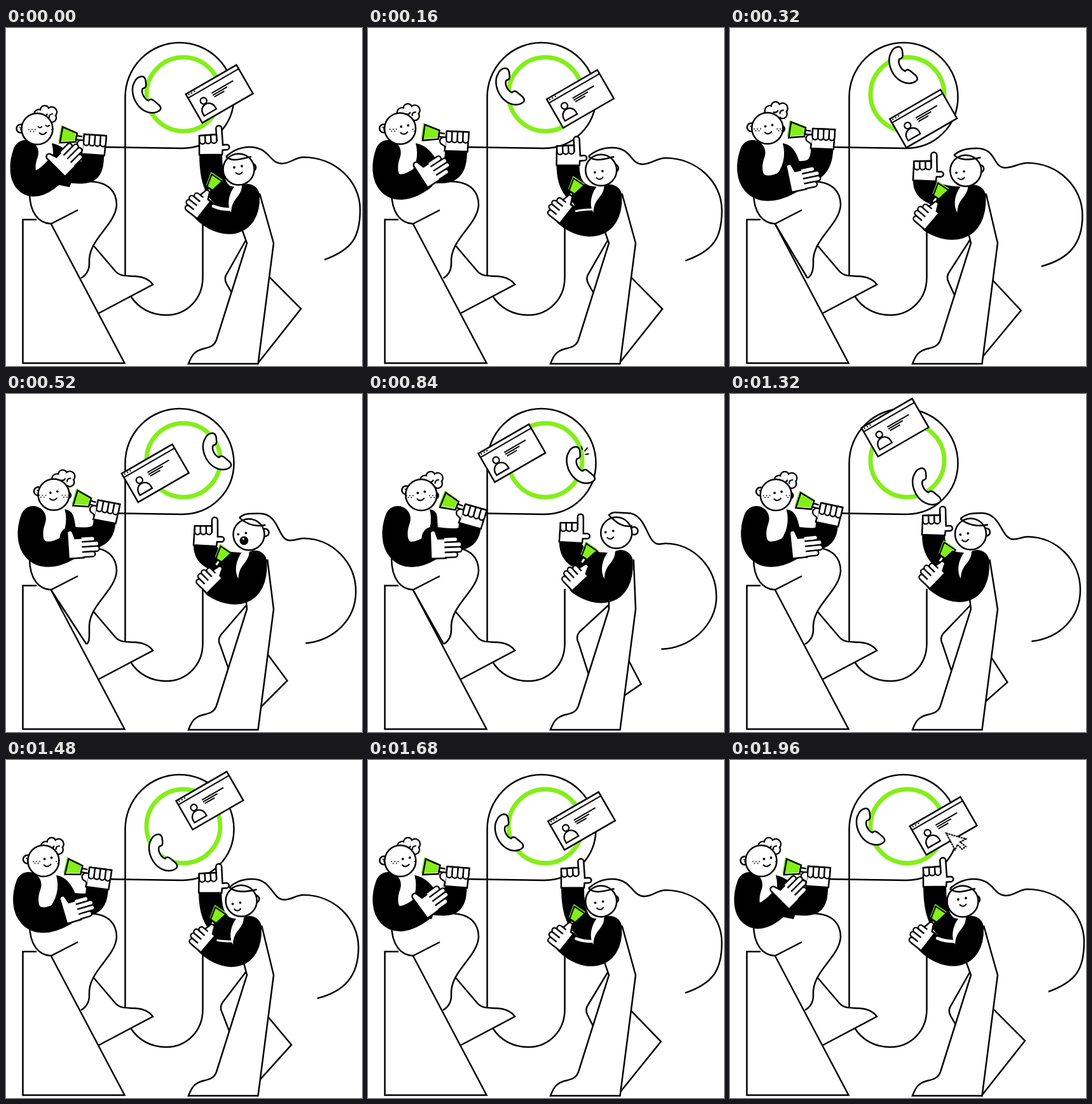
Recreate the animation shown at these times as an HTML page with a canvas. Size 560x531 px, loop 2000 ms.

```html
<!DOCTYPE html>
<html lang="en">
<head>
<meta charset="utf-8">
<title>Call loop</title>
<style>
html, body { margin: 0; width: 560px; height: 531px; overflow: hidden; background: #fff; }
canvas { display: block; }
</style>
</head>
<body>
<canvas id="stage" width="560" height="531"></canvas>
<script>
const ctx = document.getElementById('stage').getContext('2d');
const LIME = '#84ee1a', BLACK = '#000', WHITE = '#fff';
const LOOP = 2000, HALF = LOOP / 2, STEP = 40, RAD = Math.PI / 180;
let t = 0;

// S-curve that passes one half at p = mid.
function ease(p, mid) {
  if (p <= 0) return 0;
  if (p >= 1) return 1;
  const odds = (p / (1 - p) * (1 - mid) / mid) ** 2.4;
  return odds / (1 + odds);
}
const out = mid => ease(t / HALF, mid);
const back = mid => ease(t / HALF - 1, mid);
const swing = (outMid, backMid) => out(outMid) - back(backMid);
const between = (a, b) => t >= a && t < b;

// Every part moves from its rest pose by a share of one of these.
let sway, lean, stride, reach, quick, dip;
function setMotion() {
  sway = swing(.41, .385);
  lean = swing(.46, .32);
  stride = swing(.47, .45);
  reach = swing(.22, .55);
  quick = swing(.22, .385);
  dip = quick - sway;
}

function ink(d, fill = WHITE, width = 2.5) {
  const p = new Path2D(d);
  if (fill) { ctx.fillStyle = fill; ctx.fill(p); }
  if (width) { ctx.strokeStyle = BLACK; ctx.lineWidth = width; ctx.stroke(p); }
}
const line = (d, width) => ink(d, null, width);
function sleeve(d, width, color = BLACK) {
  ctx.lineCap = 'round';
  ctx.strokeStyle = color;
  ctx.lineWidth = width;
  ctx.stroke(new Path2D(d));
  ctx.lineCap = 'butt';
}
const disc = (x, y, r) => `M${x - r} ${y}a${r} ${r} 0 1 0 ${2 * r} 0a${r} ${r} 0 1 0 ${-2 * r} 0Z`;
const dot = (x, y, r) => ink(disc(x, y, r), BLACK, 0);
function place([x, y], deg, draw) {
  ctx.save();
  ctx.translate(x, y);
  ctx.rotate(deg * RAD);
  draw();
  ctx.restore();
}
function offset([x, y], deg, dx, dy) {
  const c = Math.cos(deg * RAD), s = Math.sin(deg * RAD);
  return [x + dx * c - dy * s, y + dx * s + dy * c];
}
const ellipse = (x, y, rx, ry, deg) => [x + rx * Math.cos(deg * RAD), y + ry * Math.sin(deg * RAD)];

// The lime fill is printed slightly off its outline.
function mic(size, shift) {
  ctx.scale(size, size);
  ink('M-3 9V0H3V9', WHITE, 2.4);
  place([shift, -2], 0, () => ink('M-7 0L-13 -25H13L7 0Z', LIME, 0));
  line('M-7 0L-12.5 -24H12.5L7 0Z');
}
function curled(x, y, n, w, h) {
  for (let i = 0; i < n; i++)
    ink(`M${x + i * w} ${y}v${h}a${w / 2} ${w / 2} 0 0 0 ${w} 0v${-h}`, WHITE, 2.3);
}

function scenery() {
  line('M187.5 389V108.5A85.5 85.5 0 0 1 358.5 108.5C358.5 153 323 189 277 189L150 187');
  line('M309.5 306V392C309.5 425 285 451 252 451C228 451 208 440 196 421');
  ctx.strokeStyle = LIME;
  ctx.lineWidth = 7;
  ctx.stroke(new Path2D(disc(279, 104, 58)));
}

function phone() {
  const deg = 181 + 187 * out(.34) + 173 * back(.41);
  place(ellipse(278, 106, 57, 47.5, deg), 0, () => {
    ink('M-9 -29C-3 -30 -1 -25 -1 -19C0 -14 -1 -11 -6 -10C-9 -4 -4 6 3 9C6 5 10 7 14 11L20 16' +
      'C25 22 21 25 16 27C4 31 -8 24 -15 14C-23 2 -24 -12 -19 -20C-17 -25 -14 -28 -9 -29Z');
    if (between(680, 1000)) line('M3 -24L1 -30M6 -22L11 -28M7 -17L13 -18', 2);
  });
}

function card() {
  const deg = 6.5 + 180.5 * out(.39) + 179.5 * back(.385);
  place(ellipse(281, 98, 55, 49, deg), -30, () => {
    ink('M-46 -26H46V26H-46Z');
    line('M-46 -19H46', 2);
    for (let i = 0; i < 3; i++) ink(`M${-43 + i * 5} -24h2v2h-2Z`, BLACK, 0);
    ink(disc(-27, -3, 5), WHITE, 2.3);
    ink('M-38 18V14A11 11 0 0 1 -16 14V18Z', WHITE, 2.3);
    line('M-10 -7H29M-10 -3.5H16M-9 0H9', 2);
  });
}

function cursor() {
  if (t < 1760) return;
  ctx.setLineDash([3, 1]);
  ink('M340 115L371 124L362 129L371 136L365 140L358 133L354 141Z', WHITE, 2.2);
  ctx.setLineDash([]);
}

function manLegs() {
  const foot = 118 + 16 * (out(.41) - out(.65));
  line('M48 301H26.5V526.5H186.5L71 308');
  line('M37 258C37 291 52 307 71 307.5L113 286');
  line(`M126 241C164 240 174 260 174 278C172 311 128 332 131 370C131 384 ${foot + 5} 390 ${foot} 393`);
  if (foot > 119) line(`M71 308L${foot} 393`);
  line('M137 341L172 382C180 391 190 389 203 390C218 391 226 396 231 403L146 448');
}

function manHead() {
  const x = 49 + 35 * sway, y = 158.5 - 2 * dip;
  const curls = [[-9, 2, 8], [0, -5, 7], [11, -2, 8], [11, 7, 7], [2, 6, 8]];
  place([x + 12 + 3 * sway, 134 - 12 * dip], 0, () => {
    curls.forEach(c => ink(disc(...c)));
    curls.forEach(([cx, cy, r]) => ink(disc(cx, cy, r - 1.2), WHITE, 0));
    line('M-4 4q6 2 8 -3M7 7q-1 -6 6 -6', 2.2);
  });
  const earX = x - 26 + 2 * sway, earY = 158 - 7 * sway;
  ink(disc(earX, earY, 6.5));
  line(`M${earX - 2} ${earY - 2}q4 1 2 5`, 1.8);
  const turn = 10 * (1 - quick);
  if (turn < 5) ink(disc(x + 22, y + 1, 5), BLACK);
  ink(disc(x, y, 24.5));
  ctx.save();
  ctx.clip(new Path2D(disc(x, y, 24)));
  place([x + turn, y - 4], 0, () => {
    if (t < 120) line('M-9 0q3 4 7 0M3 -2q3 4 7 0', 1.8);
    else { dot(-5.5, 1, 1.9); dot(5.5, -1, 1.9); }
    line('M-7 10Q-1 16 5 9', 2);
    for (const side of [-18, 18])
      for (let i = 0; i < 5; i++) dot(side - 5 + i * 2.5, 5 + i % 2 * 3, .9);
  });
  ctx.restore();
}

function man() {
  const grip = [138 + 27 * sway, 182 + 9 * sway - 24 * dip];
  const gripDeg = 4 + 12 * sway - 10 * dip;
  const hand = [97 + 24.5 * reach, 205 + 36 * Math.sqrt(reach)], handDeg = -45 + 43 * reach;
  const edge = 31 + 16 * sway, lapel = 72 + 25 * sway + 8 * dip;
  const cuff = offset(grip, gripDeg, 0, 17), wrist = offset(hand, handDeg, -23, 0);

  sleeve(`M${cuff}C${cuff[0] - 1} ${cuff[1] + 28} 132 229 102 226`, 35);
  ink(`M${lapel} 181C${lapel + 18} 184 106 200 112 218L100 250L75 245L${lapel - 14} 236Q${lapel + 8} 212 ${lapel} 181Z`, BLACK, 0);
  sleeve(`M${edge} 196C${edge - 14} 234 ${edge + 5} 270 ${wrist}`, 40);
  manHead();

  place(offset(grip, gripDeg, -28, -8), gripDeg - 84, () => mic(1, 2));
  place(grip, gripDeg, () => {
    ink('M-18 17L-16 -14H19L18 17Z');
    ink('M-16 -4C-24 -6 -28 0 -25 5C-23 9 -18 7 -17 12', WHITE, 2.3);
    curled(-16, -14, 4, 8.7, 13);
    line('M-16 -14H19');
  });
  place(hand, handDeg, () => {
    ink('M2 17H-23V-22a4.5 4.5 0 0 1 9 -1L-11 -14H2');
    [16, 22, 22, 15].forEach((end, i) =>
      ink(`M-1 ${-16 + i * 8}H${end}a4 4 0 0 1 0 8H-1`, WHITE, 2.3));
  });
}

function womanLegs() {
  const kx = 348 - 16 * stride, ky = 385 - 11 * stride;
  const calf = [354 - 7 * stride, 414 + 27 * stride];
  const heel = [464 - 35 * stride, 441 + 15 * stride];
  ink(`M378 332L${kx} ${ky}Q${kx - 6} ${ky + 8} ${kx - 1} ${ky + 17}L${calf}` +
    `L396 ${527 - 49 * stride}L${heel}L410 ${387 + 32 * stride}Z`);
  ink(`M${371 + 8 * sway} 316L379 338L331 490C327 501 318 502 310 504C294 508 291 518 287 527.5` +
    `H396.5L421 338L${399 + 19 * lean} 260`);
}

function womanHair() {
  const sx = 346 + 33 * lean, sy = 202 - 12 * lean;
  const tx = 383 + 25 * lean, ty = 187 + 4 * dip;
  const dx = 434 + 24 * lean - 12 * dip, dy = 213 + 23 * sway;
  const rx = 557 - 9 * sway, ry = 285 + 34 * sway;
  const ex = 501 - 40 * sway, ey = 364 + 37 * sway;
  const top = 203 + 32 * sway, pull = (468 - dx) * .4;
  const fx = 386 + 30 * sway, fy = 202 + 5 * sway;
  line(`M${sx} ${sy}C${sx + 10} ${sy + 9} ${fx - 18} ${fy + 4} ${fx} ${fy}`);
  line(`M${sx} ${sy}C${sx + 8} ${sy - 7} ${tx - 18} ${ty} ${tx} ${ty}` +
    `C${tx + 32} ${ty} ${dx - 20} ${dy} ${dx} ${dy}` +
    `C${dx + pull} ${dy} ${468 - pull} ${top} 468 ${top}` +
    `C${468 + (rx - 468) * .55} ${top} ${rx} ${ry - (ry - top) * .55} ${rx} ${ry}` +
    `C${rx} ${ry + (ey - ry) * .55} ${ex + 44} ${ey - 16 * (1 - sway)} ${ex} ${ey}`);
}

function womanHead() {
  const x = 366 + 25 * lean, y = 222 - 4 * lean + 6 * dip;
  ink(disc(x + 21 + 7 * lean, y - 3, 6));
  ink(disc(x, y, 24.5));
  womanHair();
  const nod = 32 * reach * (1 - reach);
  place([x - 1 - 10 * reach, y - 4 + 2 * sway + nod], 0, () => {
    dot(-6, 1, 1.9);
    dot(6, -1, 1.9);
    if (between(440, 640) || between(1080, 1300)) {
      dot(3, 11, 6.8);
      ink(disc(2, 8, 1.6), WHITE, 0);
    } else line('M-4 9Q2 15 7 8', 2);
  });
}

function woman() {
  const tip = [334 - 28 * dip, 154 + 35 * quick + 30 * dip], tipDeg = -4 * (1 - quick);
  const hand = [301 + 24 * sway, 278 + 10 * sway + 30 * dip], handDeg = -52 + 9 * sway;
  const sx = 380 + 18 * lean, sy = 264 + 3 * dip, sag = 314 + 3 * sway + 12 * dip;
  const cuff = offset(tip, tipDeg, -15, 44), wrist = offset(hand, handDeg, 0, 13);
  const gap = 1 - 1.5 * quick;

  sleeve(`M${cuff}Q${cuff[0]} 264 ${sx - 25} 267`, 36);
  sleeve(`M${wrist}C${wrist[0] + 28} ${sag} ${sx + 2} ${sag} ${sx} ${sy}`, 38);
  ink(`M${sx - 22} 254L${sx} ${sy}L${sx - 2} 300L${wrist[0] + 20} ${wrist[1]}L${cuff[0]} 258Z`, BLACK, 0);
  ink(`M${sx - 9} 247C${sx - 9} 266 ${sx - 25} 266 ${sx - 26} 290C${sx - 34} 276 ${sx - 28} 256 ${sx - 18} 246Z`, WHITE, 0);
  if (gap > 0) sleeve(`M${sx - 28} 285Q${sx - 42} 285 ${wrist[0] + 15} ${wrist[1] - 6}`, 5 * gap, WHITE);
  womanHead();

  place(tip, tipDeg, () => {
    ink('M-33 43L-31 13H-4V4A4.5 4.5 0 0 1 5 4V30H11A4 4 0 0 1 11 38H4L3 45Z');
    curled(-31, 13, 3, 9, 9);
    line('M-31 13H-4V24');
  });
  place([hand[0] + 20 - 4 * quick, hand[1] - 25 - 5 * quick], 34, () => mic(.86, -3));
  place(hand, handDeg, () => {
    ink('M-17 13V-6H15L24 -4a4 4 0 0 1 1 8L17 8V13Z');
    for (let i = 0; i < 4; i++) {
      const rise = 9 + 5 * Math.sin(i);
      ink(`M${-17 + i * 8} 0V${-rise}a4 4 0 0 1 8 0V0`, WHITE, 2.3);
    }
  });
}

function frame(now) {
  t = Math.floor(now % LOOP / STEP) * STEP;
  setMotion();
  ctx.fillStyle = WHITE;
  ctx.fillRect(0, 0, 560, 531);
  scenery();
  phone();
  card();
  manLegs();
  man();
  womanLegs();
  woman();
  cursor();
  requestAnimationFrame(frame);
}
requestAnimationFrame(frame);
</script>
</body>
</html>
```
